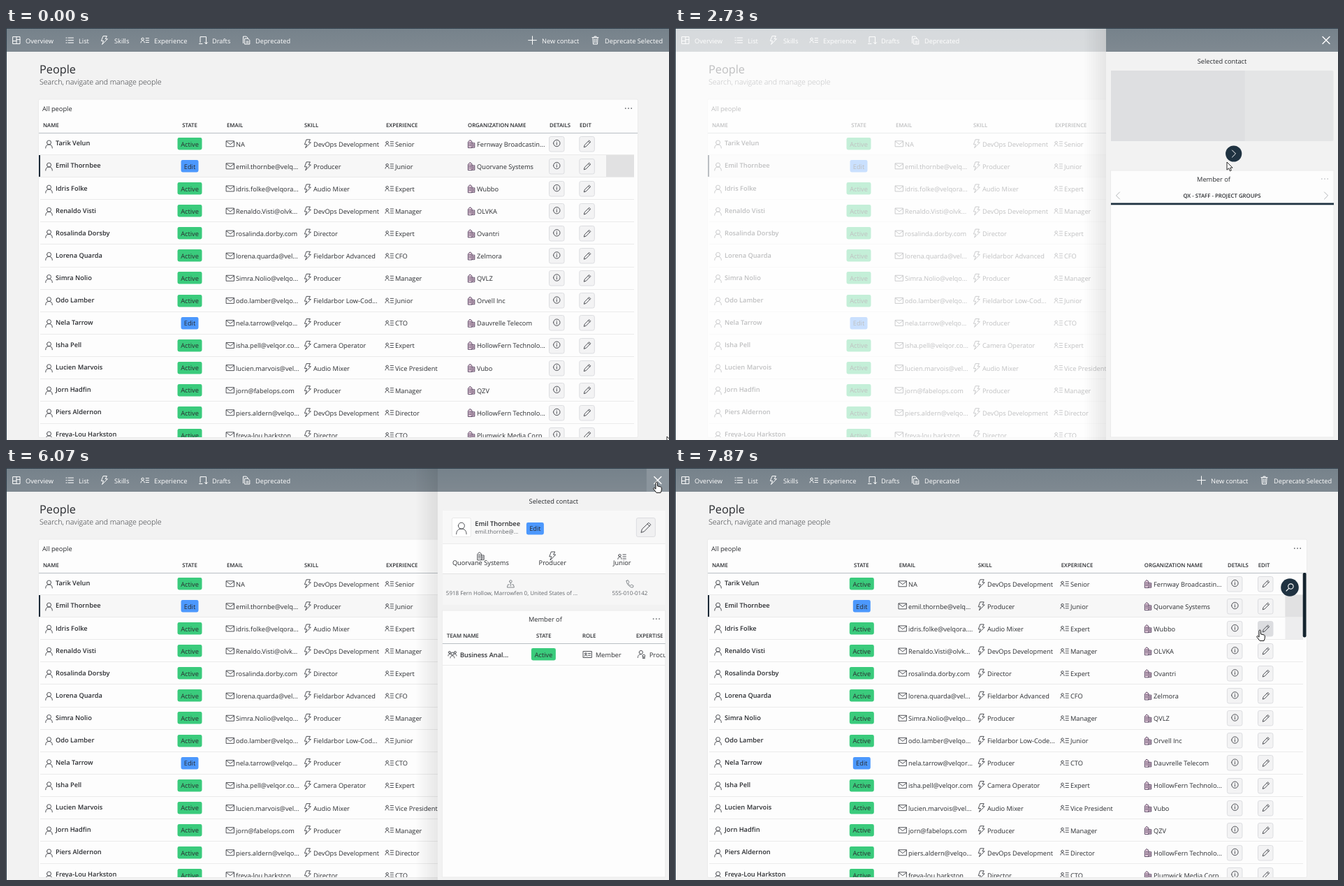
An HTML page that plays this animation: 949 by 590 pixels, repeating every 8 s.

```html
<!DOCTYPE html>
<html lang="en">
<head>
<title>People</title>
<style>
html, body { margin: 0; width: 100%; height: 100%; overflow: hidden; background: #f2f2f2; }
svg { display: block; width: 949px; height: 590px; }
text { font: 9.25px "Open Sans", "Noto Sans", sans-serif; fill: #2a2c30; text-rendering: geometricPrecision; }
.b { font-weight: 600; }
.h { font-size: 7.8px; font-weight: 600; }
.s { font-size: 8px; fill: #62666b; }
.m { text-anchor: middle; }
.w text { fill: #fff; }
.i { fill: none; stroke: #33363b; stroke-width: .85; stroke-linejoin: round; stroke-linecap: round; vector-effect: non-scaling-stroke; }
.w .i { stroke: #fff; stroke-width: 1; }
.w .bold { stroke-width: 1.4; }
.org { stroke: #43304f; fill: #ecd3e2; }
.find { stroke: #fff; stroke-width: 1.1; }
.pale { stroke: #a4a8ac; }
.soft { stroke: #70757a; }
</style>
</head>
<body>
<script>
const LOOP = 8000, PITCH = 32.08, DARK = '#1f3241';
let css = '';

// Turns [ms, value] pairs into a looping keyframe rule for one element.
function animate(id, prop, keys, timing = 'linear') {
  const all = [[0, keys[0][1]], ...keys, [LOOP, keys[keys.length - 1][1]]];
  const steps = all.map(([ms, v]) => `${(ms / LOOP * 100).toFixed(3)}%{${prop}:${v}}`).join('');
  css += `@keyframes ${id}{${steps}}#${id}{animation:${id} ${LOOP}ms ${timing} infinite}`;
}
function show(id, ...spans) {
  const keys = spans.flatMap(([from, to]) => [[from, 1], [to, 0]]);
  if (spans[0][0] > 0) keys.unshift([0, 0]);
  animate(id, 'opacity', keys, 'step-end');
}
const move = (id, keys) =>
  animate(id, 'transform', keys.map(([ms, x, y = 0]) => [ms, `translate(${x}px,${y}px)`]));

const ring = (x, y, r) => `M${x - r} ${y}a${r} ${r} 0 1 0 ${2 * r} 0a${r} ${r} 0 1 0 ${-2 * r} 0`;
const icons = {
  person: ring(0, -2.2, 3) + 'M-4.8 5.8C-4.8 2.4-3 .8 0 .8S4.8 2.4 4.8 5.8',
  mail: 'M-5.5-4h11v8h-11zM-5.5-3.4L0 .9 5.5-3.4',
  bolt: 'M-1.6-6H3.4L1.2-1.9H4.4L-3.4 6-1.4.9H-4.2z',
  exp: ring(-3.4, -1.8, 1.7) + 'M-6 3.4C-6-.8-.8-.8-.8 3.4M1.2-3H5.5M1.2 0H5.5M1.2 3H5.5',
  org: 'M-4.6 5.4V-2.4L-2-5.4 1-3.2V5.4zM1-1H4.8V5.4H1M-3.2-1.6h2.8M-3.2.6h2.8M-3.2 2.8h2.8M2.2 1.2h1.4M2.2 3.2h1.4',
  info: ring(0, 0, 4.7) + 'M0-.6V2.3M0-2.3v.2',
  pencil: 'M-5 5L-4 1.6 3-5.2 5.2-3-1.6 4zM1.6-3.8L3.8-1.6',
  grid: 'M-5-5H5V5H-5zM0-5V5M-5 1H0M0-1H5',
  list: 'M-5-3.5h1M-2-3.5H5.5M-5 0h1M-2 0H5.5M-5 3.5h1M-2 3.5H5.5',
  draft: 'M-4 3V-5H4.5V3M-5.5 5H-1M4.5 5v-4M2.5 3l2 2.4 2-2.4',
  docs: 'M-4.5 4V-5.5H0L2-3.5V-2M-2-2.5H2.5L4.8 0V5.5H-2zM0 1.5H3M0 3.5H3',
  plus: 'M-5.8 0H5.8M0-5.8V5.8',
  trash: 'M-4.5-4H4.5M-1.5-4V-5.5H1.5V-4M-3.5-4L-3 5.5H3L3.5-4M-1.2-2V3.5M1.2-2V3.5',
  close: 'M-5-5L5 5M5-5L-5 5',
  next: 'M-2-5L3 0-2 5',
  prev: 'M2-5L-3 0 2 5',
  search: ring(1.4, -1.4, 3.7) + 'M-1.3 1.3L-5 5',
  pin: ring(0, -3.5, 1.8) + 'M0-1.7V3M-2 1H-4L-5 5H5L4 1H2',
  phone: 'M-4.6-4.6L-2.6-5.4-1-2.4-2.4-1C-1.6.8-.6 1.8 1 2.5L2.4 1 5.3 2.6 4.6 4.8C1 6.5-6-1-4.6-4.6z',
  team: ring(0, -1, 2) + ring(-4, -3, 1.5) + ring(4, -3, 1.5) + 'M-3 5C-3 .5 3 .5 3 5M-6 2C-6-.5-4.5-1-3-.5M6 2C6-.5 4.5-1 3-.5',
  card: 'M-6-4.5H6V4.5H-6zM1-1.5H4.3M1 1.2H4.3' + ring(-2.5, -1, 1.3) + 'M-4.5 2.5C-4.5.3-.5.3-.5 2.5',
  skilled: ring(-1, -3, 2.6) + 'M-5.5 4.5C-5.5 1-3.5-.2-1-.2' + ring(3, 2, 1.8) + 'M1.8 3.6V6L3 5.2 4.2 6V3.6'
};

const icon = (name, x, y, extra = '', scale = 1) =>
  `<path class="i ${extra}" transform="translate(${x} ${y}) scale(${scale})" d="${icons[name]}"/>`;
const text = (x, y, str, cls = '', attrs = '') => `<text x="${x}" y="${y}" class="${cls}" ${attrs}>${str}</text>`;
const rect = (x, y, w, h, fill, attrs = '') =>
  `<rect x="${x}" y="${y}" width="${w}" height="${h}" fill="${fill}" ${attrs}/>`;
const group = (id, body, attrs = '') => `<g id="${id}" ${attrs}>${body}</g>`;
const clip = (id, x, y, w, h) => `<clipPath id="${id}">${rect(x, y, w, h, '#000')}</clipPath>`;
const dots = (x, y, fill) => [-4.2, 0, 4.2].map(d => `<circle cx="${x + d}" cy="${y}" r=".85" fill="${fill}"/>`).join('');
const button = (x, y, size, fill = '#f3f3f4') => rect(x, y, size, size, fill, 'rx="2.5" stroke="#dcdde0"');
const badge = (cx, cy, state) => {
  const w = state === 'Edit' ? 25 : 35;
  return rect(cx - w / 2, Math.round(cy - 8.8), w, 17.5, state === 'Edit' ? '#4c98fd' : '#3acb7c', 'rx="2.4"') +
    text(cx, cy + 3.8, state, 'm');
};
const finder = id => group(id, `<circle r="12.8" fill="${DARK}"/>` + icon('search', 0, 0, 'find'));

const pen = document.createElement('canvas').getContext('2d');
pen.font = '9.25px "Open Sans", "Noto Sans", sans-serif';
function fit(str, width) {
  if (pen.measureText(str).width <= width) return str;
  while (pen.measureText(str + '...').width > width) str = str.slice(0, -1);
  return str + '...';
}

const people = `Tarik Velun|NA|DevOps Development|Senior|Fernway Broadcasting Group
Emil Thornbee|emil.thornbe@velqora.com|Producer|Junior|Quorvane Systems
Idris Folke|idris.folke@velqora.com|Audio Mixer|Expert|Wubbo
Renaldo Visti|Renaldo.Visti@olvkar.com|DevOps Development|Manager|OLVKA
Rosalinda Dorsby|rosalinda.dorby.com|Director|Expert|Ovantri
Lorena Quarda|lorena.quarda@velqora.com|Fieldarbor Advanced|CFO|Zelmora
Simra Nolio|Simra.Nolio@velqora.com|Producer|Manager|QVLZ
Odo Lamber|odo.lamber@velqora.org|Fieldarbor Low-Code Apps|Junior|Orvell Inc
Nela Tarrow|nela.tarrow@velqora.com|Producer|CTO|Dauvrelle Telecom
Isha Pell|isha.pell@velqor.com|Camera Operator|Expert|HollowFern Technologies
Lucien Marvois|lucien.marvois@velqora.com|Audio Mixer|Vice President|Vubo
Jorn Hadfin|jorn@fabelops.com|Producer|Manager|QZV
Piers Aldernon|piers.aldern@velqora.com|DevOps Development|Director|HollowFern Technologies
Freya-Lou Harkston|freya-lou.harkston@velqora.com|Director|CTO|Plumwick Media Corp`
  .split('\n').map(line => line.split('|'));

function table(stretch, hotEdit) {
  const at = x => x + (x - 48) * stretch;
  const tail = at(859);
  const head = [['NAME', 53], ['EMAIL', 316], ['SKILL', 427], ['EXPERIENCE', 544],
    ['ORGANIZATION NAME', 661], ['DETAILS', 778], ['EDIT', 821]]
    .map(([label, x]) => text(label === 'NAME' ? x : at(x), 141.6, label, 'h')).join('') +
    text(at(263), 141.6, 'STATE', 'h m');
  const rows = people.map(([name, mail, skill, level, org], i) => {
    const y = 165.8 + PITCH * i, base = y + 3.9;
    return (i === 1 ? rect(48, 182, 851, 31, '#f7f7f7') + rect(tail, 182, 899 - tail, 31, '#e1e1e2') +
        rect(47, 182, 2, 31, '#1b2a37') : '') +
      rect(49, Math.floor(y + 15.8), 850, 1, '#ebebeb') +
      icon('person', 61.5, y + .4) + text(71, y + 2.6, name, 'b') +
      badge(at(263) + (stretch ? .5 : 0), y, i === 1 || i === 8 ? 'Edit' : 'Active') +
      icon('mail', at(321), y) + text(at(329), base, fit(mail, 91 + 100 * stretch)) +
      icon('bolt', at(432), y) + text(at(440), base, fit(skill, 95.5 + 200 * stretch)) +
      icon('exp', at(549), y) + text(at(557), base, level) +
      icon('org', at(666), y, 'org') + text(at(674), base, fit(org, 98 + 100 * stretch)) +
      button(at(777.5), Math.round(y - 11) + .5, 21.5) + icon('info', at(788.3), y - .8) +
      button(at(820.8), Math.round(y - 11) + .5, 21.5, hotEdit && i === 2 ? '#dcdde0' : undefined) +
      icon('pencil', at(832), y, '', .92);
  }).join('');
  return head + rect(47, 150, 857, 1, '#b9bfc4') + `<g clip-path="url(#body)">${rows}</g>`;
}

const nav = [['grid', 15, 'Overview', 28], ['list', 91, 'List', 104], ['bolt', 141, 'Skills', 155],
  ['exp', 199, 'Experience', 212], ['draft', 282, 'Drafts', 295], ['docs', 344, 'Deprecated', 357],
  ['plus', 753.5, 'New contact', 767], ['trash', 843.5, 'Deprecate Selected', 857]]
  .map(([name, x, label, tx]) => icon(name, x, 17.6) + text(tx, 21.5, label)).join('');

const page = rect(0, 0, 949, 590, '#f2f2f2') + rect(0, 0, 949, 34, 'url(#bar)') + `<g class="w">${nav}</g>` +
  text(48, 65.3, 'People', '', 'style="font-size:16.3px"') +
  text(48, 81, 'Search, navigate and manage people', '', 'style="font-size:10.6px;font-weight:300;fill:#2f3236"') +
  rect(46.5, 102, 858, 484.5, '#fdfdfd', 'rx="2" stroke="#ebebeb"') +
  text(52, 118.5, 'All people') + dots(891, 115, '#44484d') +
  group('wide', table(0)) + group('wider', table(.0177, true)) +
  group('edges', rect(655, 127, 1, 23, '#dcdcdc') + rect(772, 127, 1, 23, '#dcdcdc')) +
  group('first', rect(859, 151, 40, 30, '#e9e9ea')) +
  group('third', rect(859, 214, 40, 31, '#ededee')) +
  group('thirdB', rect(873.4, 214, 25.6, 31, '#ededee')) +
  group('load', rect(859, 150.3, 40, 2.4, '#8e979e')) +
  group('hot', button(777.5, 187.5, 21.5, '#dcdde0') + icon('info', 788.3, 197.1)) +
  `<g clip-path="url(#body)">${group('bar1', rect(898.7, 150, 4.8, 92.5, '#14232e', 'rx="2.2"'))}${finder('find1')}</g>`;

const skeleton = rect(624, 61, 318.5, 101, '#e4e5e6', 'rx="2"') +
  `<g clip-path="url(#ghost)">${group('sweep', rect(305, 61, 319, 101, '#dedfe1'))}</g>` +
  `<g class="w"><circle cx="799.7" cy="180" r="11.6" fill="${DARK}"/>${icon('next', 799.5, 180)}</g>`;
const tabs = dots(930, 216, '#b9bcc0') + icon('prev', 634.5, 240, 'pale') + icon('next', 931.5, 240, 'pale') +
  text(783, 242.5, 'QX - STAFF - PROJECT GROUPS', 'h m') + rect(624, 250.5, 319, 2.8, DARK);

const profile = rect(624, 61, 319, 48, '#f8f8f8') + rect(624, 109, 319, 42, '#fdfdfd') +
  rect(624, 151, 319, 45, '#f6f6f6') + rect(624, 108, 319, 1, '#ebebeb') + rect(624, 151, 319, 1, '#e4e4e4') +
  rect(637.5, 71.5, 27, 27, '#fff', 'rx="2" stroke="#e8e8e8"') + icon('person', 651, 86, '', 1.5) +
  text(670.5, 83, 'Emil Thornbee', 'b') + text(670.5, 94, 'emil.thornbe@...', 's') +
  badge(756.5, 86.3, 'Edit') + button(901.5, 71.5, 27, '#f0f0f1') + icon('pencil', 915, 85.3, '', 1.35) +
  icon('org', 678.5, 126) + text(678.5, 139.3, 'Quorvane Systems', 'm') +
  icon('bolt', 781.5, 126) + text(781.5, 139.3, 'Producer', 'm') +
  icon('exp', 881, 127) + text(881, 139.3, 'Junior', 'm') +
  icon('pin', 721.5, 166, 'soft') + text(629, 181.8, '5918 Fern Hollow, Marrowfen 0, United States of ...', 's') +
  icon('phone', 892, 166, 'soft') + text(892, 181.8, '555-010-0142', 's m');

const members = dots(930, 216, '#44484d') +
  text(630, 242.6, 'TEAM NAME', 'h') + text(758, 242.6, 'STATE', 'h') + text(824, 242.6, 'ROLE', 'h') +
  `<g clip-path="url(#cut)">${text(901, 242.6, 'EXPERTISE', 'h')}</g>` +
  rect(624, 251, 319, 1, '#b9bfc4') + rect(624, 282, 319, 1, '#ebebeb') +
  icon('team', 638, 267) + text(649, 270.6, 'Business Anal...', 'b') + badge(768.5, 267, 'Active') +
  icon('card', 831.5, 267) + text(843, 270.6, 'Member') + icon('skilled', 909, 267) +
  `<g clip-path="url(#team)">${text(920, 270.6, 'Procurement')}` +
  group('bar2', rect(623.5, 580.7, 276.5, 5, '#14232e', 'rx="2.4"')) + finder('find2') + '</g>';

const panel = rect(585, 0, 32, 590, 'url(#shade)') + rect(617, 0, 332, 590, '#f2f2f2') +
  rect(617, 0, 332, 34, 'url(#bar)') + group('closeHot', rect(916, 1, 33, 33, '#8b959d')) +
  `<g class="w">${icon('close', 932, 17.5, 'bold')}</g>` + text(783, 51, 'Selected contact', 'm') +
  rect(623.5, 204, 319.5, 382, '#fdfdfd', 'stroke="#ebebeb"') + text(771, 219.6, 'Member of', 'm') +
  group('skeleton', skeleton) + group('tabs', tabs) + group('profile', profile) + group('members', members);

const cursor = group('hand', '<path fill="#fff" stroke="#111" d="M-1 1.2c0-1.6 2.4-1.6 2.4 0v4.6l4.6 1.2c1 .3 1.3.9 1.3 1.8v3l-1.3 3.6h-6l-4-5.2c-.8-1.2.6-2.2 1.6-1.3L-1 10.2z"/>') +
  group('arrow', '<path fill="#fff" stroke="#111" stroke-width=".9" d="M0 0V11.2l2.6-2.4 1.8 4 1.9-.8-1.7-3.9h3.5z"/>');

// Pointer
move('cursor', [[0, 946, 585], [70, 946, 585], [450, 185, 128], [870, 505, 104], [930, 515, 105],
  [1130, 640, 132], [1330, 776, 157], [1600, 787, 190], [1730, 790, 192], [4200, 790, 192], [4530, 814, 295],
  [4720, 880, 262], [5000, 912, 140], [5070, 914, 132], [5400, 931, 20], [6130, 931, 20], [6500, 880, 145],
  [6870, 842, 225], [6930, 842, 225], [7070, 837, 232]]);
show('hand', [130, 430], [1290, 2530], [5350, 6200], [6510, 8000]);
show('arrow', [0, 130], [430, 1290], [2530, 5350], [6200, 6510]);

// People table
show('edges', [1180, 1390]);
show('first', [1290, 1450]);
show('third', [6800, 7270]);
show('thirdB', [7800, 8000]);
show('load', [6750, 6930]);
show('hot', [1560, 2530]);
show('bar1', [150, 460], [1300, 2600], [6560, 8000]);
move('find1', [[130, 920, 171], [400, 880, 171], [520, 880, 171], [850, 920, 171], [1260, 920, 171],
  [1330, 905, 171], [1520, 880, 171], [2600, 880, 171], [2900, 920, 171], [6540, 920, 171], [6830, 880, 171]]);
animate('wide', 'opacity', [[7270, 1], [7600, .55], [7799, .55], [7800, 0]]);
animate('wider', 'opacity', [[7799, 0], [7800, .75], [7866, 1]]);

// Side panel
animate('veil', 'opacity', [[2530, 0], [2730, .7], [2860, .81], [6069, .81], [6070, 0]]);
move('panel', [[2530, 365], [2600, 120], [2670, 25], [2725, 0], [6070, 0], [6140, 60], [6270, 300], [6340, 365]]);
move('sweep', [[2530, 64], [2730, 191], [2930, 319]]);
show('skeleton', [0, 3470]);
show('tabs', [0, 3530]);
show('profile', [3470, 8000]);
show('members', [3530, 8000]);
show('bar2', [4330, 4930]);
move('find2', [[4400, 957, 272], [4530, 928, 272], [4620, 919, 272], [4930, 919, 272], [5330, 957, 272]]);
show('closeHot', [5330, 6400]);

const gradient = (id, dir, stops) => `<linearGradient id="${id}" x1="0" y1="0" ${dir}="1" ${dir === 'y2' ? 'x2="0"' : 'y2="0"'}>` +
  stops.map(([o, c, a]) => `<stop offset="${o}" stop-color="${c}" stop-opacity="${a}"/>`).join('') + '</linearGradient>';

document.body.innerHTML = `<svg viewBox="0 0 949 590"><defs>
  ${gradient('bar', 'y2', [[0, '#76828b', 1], [1, '#7f8991', 1]])}
  ${gradient('shade', 'x2', [[0, '#000', 0], [1, '#000', .085]])}
  ${clip('body', 47, 150, 857, 436)}${clip('ghost', 624, 61, 318.5, 101)}
  ${clip('cut', 901, 230, 38, 20)}${clip('team', 623, 204, 320, 383)}</defs>
  ${page}${group('veil', rect(0, 0, 949, 590, '#fff'))}${group('panel', panel)}
  ${rect(0, 0, 949, 1, '#2f3e4a')}${rect(0, 0, 1, 590, '#2f3e4a')}${group('cursor', cursor)}</svg>`;
const style = document.createElement('style');
style.textContent = css;
document.head.append(style);
</script>
</body>
</html>
```
